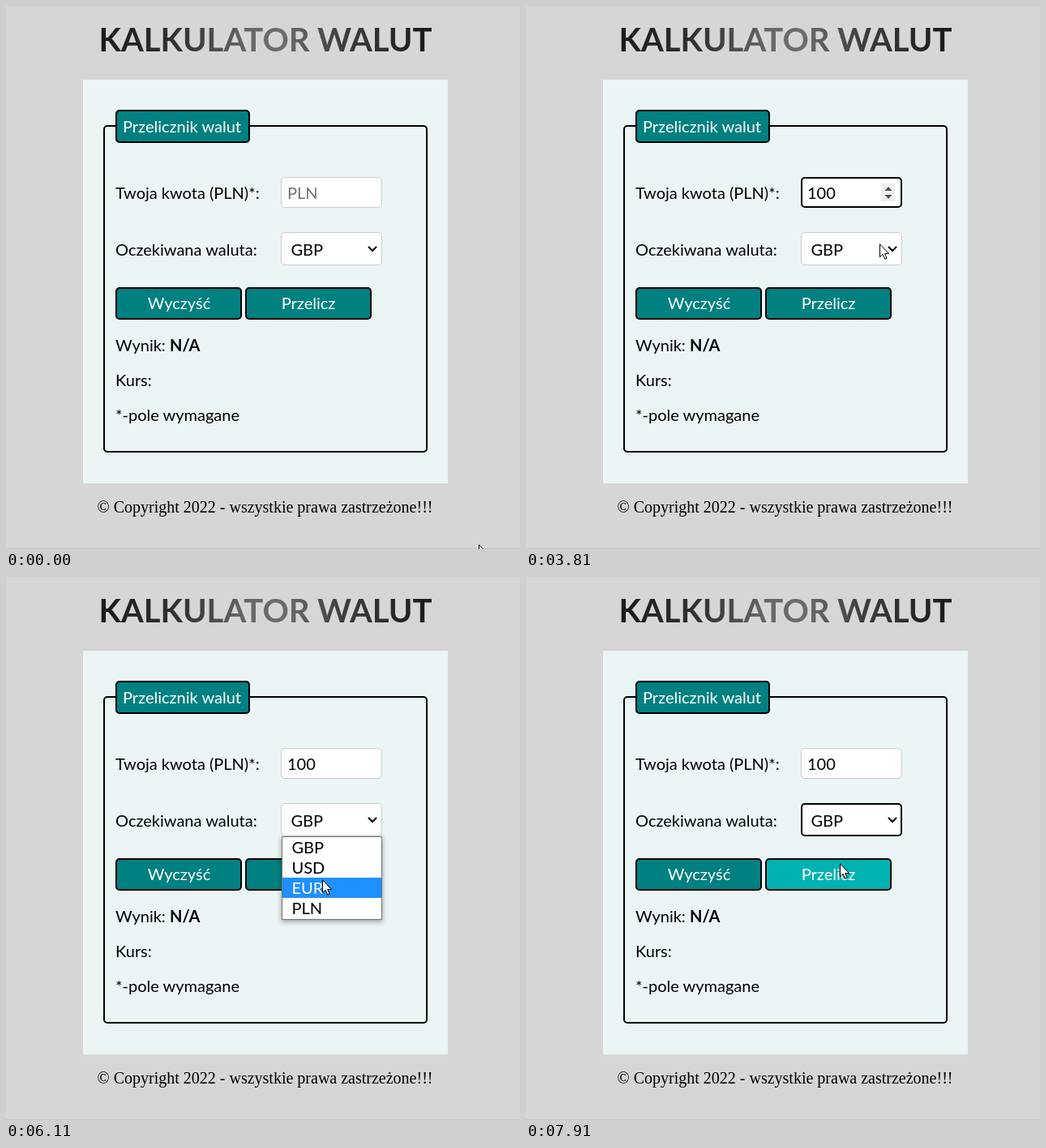
Write an HTML page that moves like this. It is 634x670 px and loops after 7.99 s.

```html
<!DOCTYPE html>
<html lang="pl">
<head>
<meta charset="utf-8">
<title>Kalkulator walut</title>
<style>
  html, body { margin: 0; width: 100%; height: 100%; overflow: hidden; background: #d6d6d6; }
  svg { display: block; font: 20px Lato, sans-serif; cursor: default; }
  .title { font-size: 40px; font-weight: 700; }
  .footer { font: 20px "Liberation Serif", serif; }
  .mid { text-anchor: middle; }
  .teal { fill: teal; stroke: #000; stroke-width: 2; }
  .light { fill: #fff; }
  .field { fill: #fff; stroke: #ccc; }
  .focus { fill: none; stroke: #000; stroke-width: 2; }
  #list { filter: drop-shadow(0 2px 3px rgba(0, 0, 0, .4)); }
</style>
</head>
<body>
<svg width="634" height="670" viewBox="0 0 634 670">
  <defs>
    <linearGradient id="shine" gradientUnits="userSpaceOnUse" x1="116" x2="524" y1="0" y2="0">
      <stop offset="0" stop-color="#1a1a1a"/>
      <stop offset=".25" stop-color="#343434"/>
      <stop offset=".45" stop-color="#686868"/>
      <stop offset=".56" stop-color="#6c6c6c"/>
      <stop offset=".72" stop-color="#404040"/>
      <stop offset="1" stop-color="#1a1a1a"/>
    </linearGradient>
  </defs>
  <rect width="634" height="670" fill="#d6d6d6"/>
  <rect y="669" width="634" height="1" fill="#c6c6c6"/>
  <text class="title mid" x="320" y="56" fill="url(#shine)">KALKULATOR WALUT</text>
  <rect x="95" y="91" width="450" height="498" fill="#ebf5f6"/>
  <rect class="focus" x="121" y="148" width="398" height="402" rx="4"/>
  <rect class="teal" x="136" y="129" width="164" height="39" rx="4"/>
  <text class="light" x="144" y="156">Przelicznik walut</text>

  <text x="135" y="238">Twoja kwota (PLN)*:</text>
  <rect class="field" x="339.5" y="211.5" width="124" height="37" rx="4.5"/>
  <g id="amountFocus">
    <rect class="focus" x="340" y="212" width="123" height="36" rx="4"/>
    <rect x="438" y="219" width="17" height="22" fill="#efefef"/>
    <path d="M442.5 228L447 223L451.500 228ZM442.5 233L447 238L451.500 233Z" fill="#505050"/>
  </g>
  <text id="amount" x="347" y="238"></text>
  <rect id="caret" y="219" width="2" height="23"/>

  <text x="135" y="308">Oczekiwana waluta:</text>
  <rect class="field" x="339.5" y="279.500" width="124" height="40" rx="4.5"/>
  <rect id="selectFocus" class="focus" x="340" y="280" width="123" height="39" rx="4"/>
  <text x="351.500" y="308">GBP</text>
  <path d="M447 297L452 302L457 297" fill="none" stroke="#000" stroke-width="2"/>

  <rect class="teal" x="136" y="348" width="154" height="38" rx="4"/>
  <text class="light mid" x="213.500" y="374">Wyczyść</text>
  <rect id="convert" class="teal" x="296" y="348" width="154" height="38" rx="4"/>
  <text class="light mid" x="373" y="374">Przelicz</text>

  <text x="135" y="426">Wynik: <tspan font-weight="700">N/A</tspan></text>
  <text x="135" y="469">Kurs:</text>
  <text x="135" y="512">*-pole wymagane</text>
  <text class="footer mid" x="319.500" y="625">© Copyright 2022 - wszystkie prawa zastrzeżone!!!</text>

  <g id="list">
    <rect x="340.5" y="320.500" width="123" height="102" fill="#fff" stroke="#777"/>
    <rect id="marker" x="341" width="122" height="25" fill="#1e90ff"/>
    <g id="options"></g>
  </g>

  <circle id="click" r="12.500" fill="#ffe600" fill-opacity=".55"/>
  <path id="arrow" d="M.5 .8V16.800L4.200 13.300L6.700 19.200L9 18.200L6.600 12.500H11.600Z" fill="#fff" stroke="#000"/>
  <path id="beam" d="M-3-6.500H0M1-6.500H4M.5-6V7M-3 7.500H0M1 7.500H4" fill="none" stroke="#000"/>
</svg>
<script>
const LOOP = 7990;
const FOCUS = 1030, OPEN = 4380, CLOSE = 7420;
const CLICKS = [[FOCUS, 100], [OPEN, 80], [CLOSE, 80]];
const KEYS = [2190, 2610, 2880];
const ROW = 25, LIST_TOP = 321;

// Pointer moves: first step time, last step time, steps, target x, target y
const MOVES = [
  [80, 700, 9, 398, 232], [780, 860, 2, 397, 237],
  [3460, 3960, 7, 446, 307], [4050, 4130, 2, 448, 302], [4210, 4210, 1, 450, 301],
  [4710, 5030, 5, 415, 360], [5360, 5440, 2, 405, 335],
  [5520, 5860, 5, 395, 388], [5940, 6110, 3, 390, 373],
  [6190, 6350, 3, 389, 335], [6600, 6840, 4, 388, 363],
  [7010, 7090, 2, 388, 347], [7170, 7250, 2, 387, 336],
  [7670, 7910, 4, 387, 353]
];

const el = id => document.getElementById(id);
const show = (id, on) => el(id).setAttribute("visibility", on ? "visible" : "hidden");
const place = (id, x, y) => el(id).setAttribute("transform", `translate(${x} ${y})`);
const ease = k => k * k * (3 - 2 * k);

const options = ["GBP", "USD", "EUR", "PLN"].map((name, i) => {
  const text = document.createElementNS("http://www.w3.org/2000/svg", "text");
  text.textContent = name;
  text.setAttribute("x", 352.5);
  text.setAttribute("y", LIST_TOP + ROW * i + 20);
  return el("options").appendChild(text);
});

function pointerAt(t) {
  let x = 583, y = 664;
  for (const [start, end, steps, toX, toY] of MOVES) {
    if (t < start) break;
    const gap = steps > 1 ? (end - start) / (steps - 1) : 1;
    const done = Math.min(steps, Math.floor((t - start) / gap + 0.01) + 1);
    const k = ease(done / steps);
    x += (toX - x) * k;
    y += (toY - y) * k;
  }
  return [Math.round(x), Math.round(y)];
}

function draw(t) {
  const [x, y] = pointerAt(t);
  const focused = t >= FOCUS && t < OPEN;
  const open = t >= OPEN && t < CLOSE;

  const typed = KEYS.filter(key => t >= key).length;
  const lastKey = typed ? KEYS[typed - 1] : 1110;
  el("amount").textContent = typed ? "100".slice(0, typed) : "PLN";
  el("amount").setAttribute("fill", typed ? "#000" : "#757575");
  el("caret").setAttribute("x", Math.floor(346 + 11.6 * typed));
  show("caret", focused && (t - lastKey) % 1000 < 500);
  show("amountFocus", focused);

  const row = Math.max(0, Math.min(3, Math.floor((y - LIST_TOP) / ROW)));
  show("list", open);
  el("marker").setAttribute("y", LIST_TOP + ROW * row);
  options.forEach((text, i) => text.setAttribute("fill", i === row ? "#fff" : "#000"));
  show("selectFocus", t >= CLOSE);
  el("convert").style.fill = t >= CLOSE && y >= 347 ? "#00b3b3" : "teal";

  const overInput = x > 339 && x < 464 && y > 211 && y < 249;
  show("arrow", !overInput);
  show("beam", overInput);
  place("arrow", x, y);
  place("beam", x, y);
  place("click", x, y - 1);
  show("click", CLICKS.some(([start, length]) => t >= start && t < start + length));
}

const began = performance.now();
function tick() {
  draw((performance.now() - began) % LOOP);
  requestAnimationFrame(tick);
}
tick();
</script>
</body>
</html>
```
